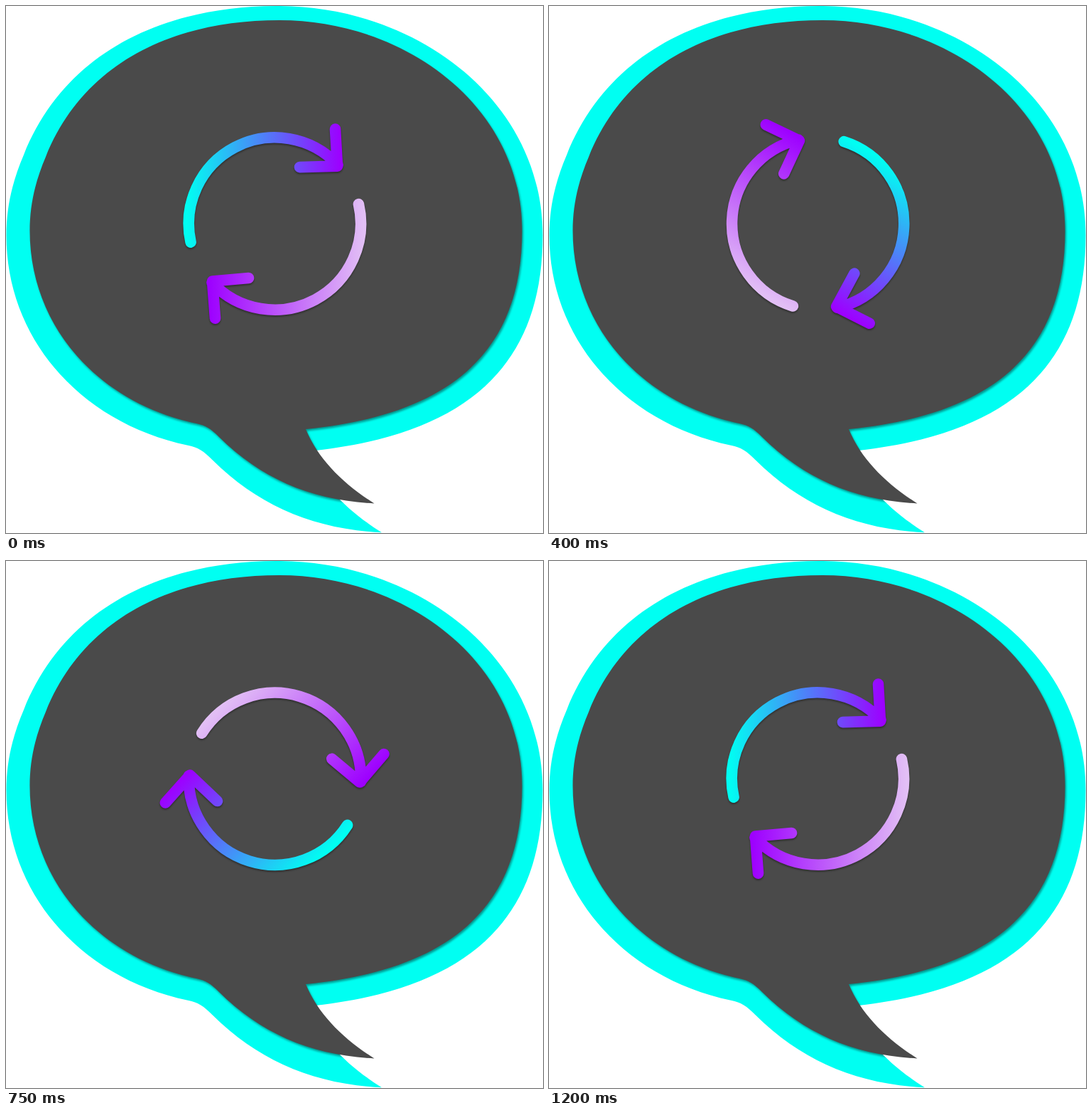
An HTML page that plays this animation: 756 by 741 pixels, repeating every 1.25 s.

```html
<!DOCTYPE html>
<html lang="en">
<head>
<meta charset="utf-8">
<title>Refresh bubble</title>
<style>
  html, body { margin: 0; width: 100%; height: 100%; overflow: hidden; background: #fff; }
  svg { display: block; }
  .shadow { filter: blur(1.6px); opacity: .42; }
  .arrows { filter: drop-shadow(.5px 2px 1px rgba(0, 0, 0, .35)); }
  .arrows path { fill: none; stroke-width: 15.6; stroke-linecap: round; stroke-linejoin: round; }
</style>
</head>
<body>
<svg width="756" height="741" viewBox="0 0 756 741">
  <defs>
    <path id="bubble" d="M33.5 316C33.5 280 41 247 56 212C109 80 235 20 385 20C561 20 726.5 140 726.5 316
      C726.5 482 632 574 422 595C440 638 475 672 518.5 699.5C430 695 360 665 300 606
      C288 594 282 590 268 587C130 558 33.5 450 33.5 316Z"/>
    <clipPath id="rim">
      <use href="#bubble" transform="matrix(1.0895 0 0 1.0895 -36 -21.8)"/>
    </clipPath>
    <linearGradient id="cool" gradientUnits="userSpaceOnUse" x1="-125" x2="93">
      <stop stop-color="#00fff2"/>
      <stop offset="1" stop-color="#9d00ff"/>
    </linearGradient>
    <linearGradient id="warm" gradientUnits="userSpaceOnUse" x1="-125" x2="93">
      <stop stop-color="#e2bff5"/>
      <stop offset="1" stop-color="#9d00ff"/>
    </linearGradient>
  </defs>

  <use href="#bubble" fill="#00fff2" transform="matrix(1.0895 0 0 1.0895 -36 -21.8)"/>
  <g clip-path="url(#rim)">
    <use class="shadow" href="#bubble" x="1.5" y="2.5"/>
  </g>
  <use href="#bubble" fill="#4a4a4a"/>

  <g class="arrows">
    <g id="spinner">
      <path stroke="url(#cool)" d="M-118.4 26A121.2 121.2 0 0 1 88.6 -82.7M35 -79.5L88 -81L85 -133"/>
      <path stroke="url(#warm)" transform="rotate(180)"
        d="M-117.9 27.5A121.2 121.2 0 0 1 88.6 -82.7M37 -76.5L88 -81L84 -133"/>
    </g>
  </g>
</svg>
<script>
  const LOOP = 1250, STEP = 50, TURN = 15;
  const spinner = document.getElementById('spinner');
  const start = performance.now();

  function draw() {
    const time = (performance.now() - start) % LOOP;
    const angle = Math.floor(time / STEP) * TURN;
    spinner.setAttribute('transform', `translate(378.5 306.1) rotate(${angle})`);
    requestAnimationFrame(draw);
  }
  draw();
</script>
</body>
</html>
```
